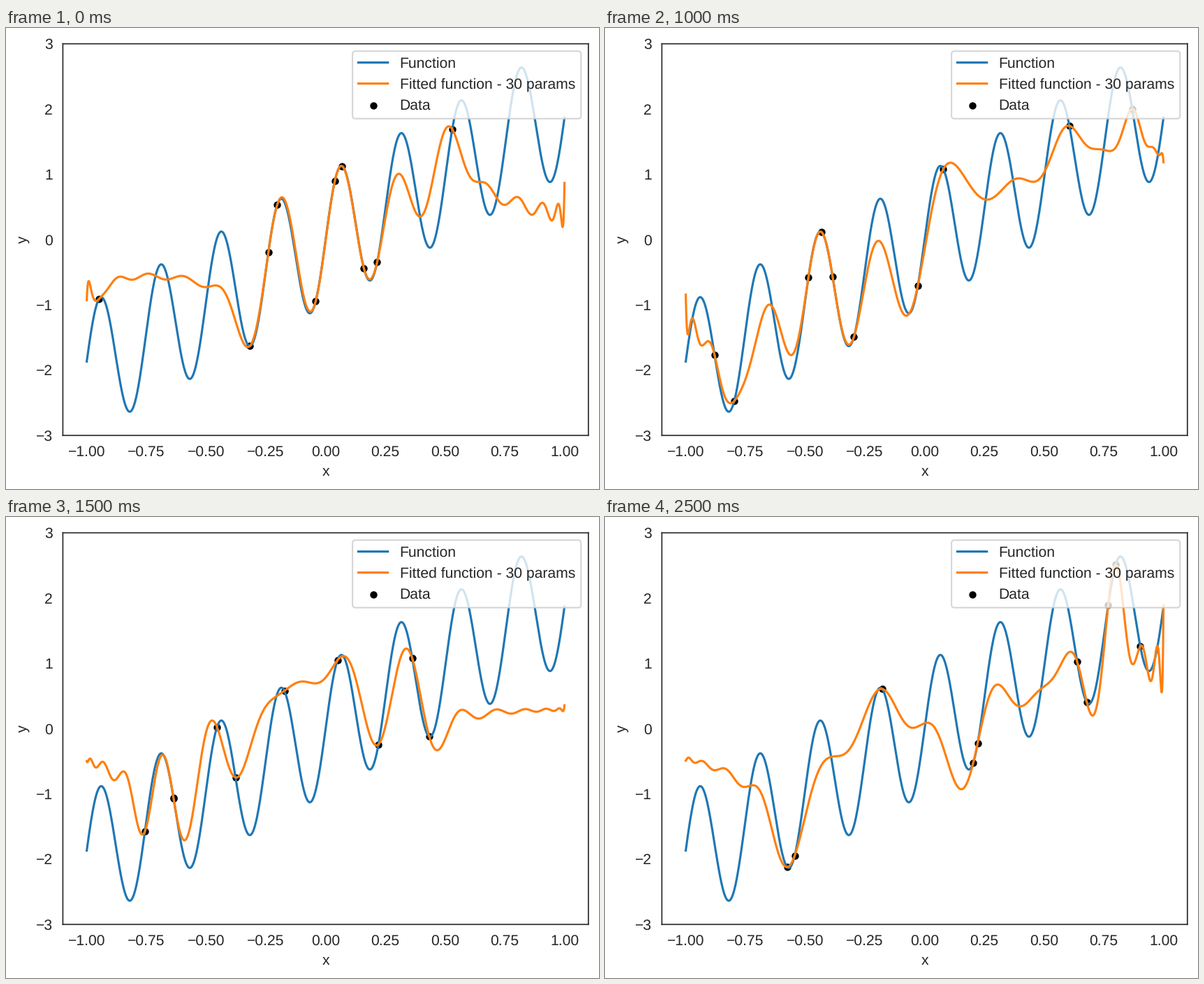
A matplotlib script for the animation above (3 s loop, 849x660 px).

```python
import numpy as np
import matplotlib.pyplot as plt
from matplotlib.animation import FuncAnimation
from numpy.polynomial.legendre import legvander

W, H, DPI = 849, 660, 144
SCALE = 151.7 / DPI          # size of one point relative to the default look
LEFT, RIGHT, TOP, BOTTOM = 81.4, 833.8, 22.6, 583.3
X_MAX, Y_MAX = 1.1, 3
PARAMS = 30

# Where the function is sampled for each fit
SAMPLES = np.array([
    [-.949, -.3175, -.2397, -.2025, -.0414, .0385, .0684, .1603, .216, .53],
    [-.9847, -.9634, -.6086, -.5131, .295, .4368, .6262, .796, .8543, .9118],
    [-.8794, -.797, -.4864, -.4316, -.3852, -.296, -.0283, .0785, .6059, .869],
    [-.7564, -.637, -.6366, -.4546, -.3772, -.1728, .05, .2211, .3625, .434],
    [-.913, -.786, -.4868, -.0325, .1005, .1344, .2663, .4175, .6118, .926],
    [-.575, -.5441, -.1775, .2038, .222, .6384, .679, .7686, .8, .9027],
])


def func(x):
    return 2 * x + np.sin(25 * x)


def features(x):
    return legvander(x, PARAMS)[:, 1:]


def fit(x):
    """Minimum-norm Legendre coefficients through the samples."""
    return np.linalg.pinv(features(x)) @ func(x)


plt.rcParams.update({
    "font.family": "Liberation Sans",
    "font.size": 10 * SCALE,
    "text.color": "0.15",
    "text.hinting": "none",
    "path.snap": False,
    "axes.labelcolor": "0.15",
    "axes.edgecolor": "0.15",
    "axes.linewidth": 0.8 * SCALE,
    "axes.labelpad": 4 * SCALE,
    "lines.linewidth": 1.5 * SCALE,
    "patch.linewidth": 1.0 * SCALE,
})
for axis in ("xtick", "ytick"):
    plt.rcParams.update({
        f"{axis}.color": "0.15",
        f"{axis}.major.size": 3.5 * SCALE,
        f"{axis}.major.pad": 3.5 * SCALE,
    })

fig = plt.figure(figsize=(W / DPI, H / DPI), dpi=DPI, facecolor="white")
ax = fig.add_axes([LEFT / W, 1 - BOTTOM / H,
                   (RIGHT - LEFT) / W, (BOTTOM - TOP) / H])
ax.set(xlim=(-X_MAX, X_MAX), ylim=(-Y_MAX, Y_MAX), xlabel="x", ylabel="y")
ax.set_xticks(np.linspace(-1, 1, 9))
ax.set_yticks(range(-3, 4))
ax.tick_params(bottom=False, left=False)

xs = np.linspace(-1, 1, 1000)
basis = features(xs)

ax.plot(xs, func(xs), color="#1f77b4", label="Function")
fit_line, = ax.plot(xs, basis @ fit(SAMPLES[0]), color="#ff7f0e",
                    label=f"Fitted function - {PARAMS} params")
dots = ax.scatter(SAMPLES[0], func(SAMPLES[0]), s=5.2 ** 2, color="black",
                  linewidths=0, label="Data")
legend = ax.legend(loc="upper right")
legend.get_frame().set_snap(False)


def update(i):
    x = SAMPLES[i]
    fit_line.set_ydata(basis @ fit(x))
    dots.set_offsets(np.column_stack([x, func(x)]))
    return fit_line, dots


anim = FuncAnimation(fig, update, frames=len(SAMPLES), interval=500,
                     repeat=True, repeat_delay=0)
plt.show()
```
